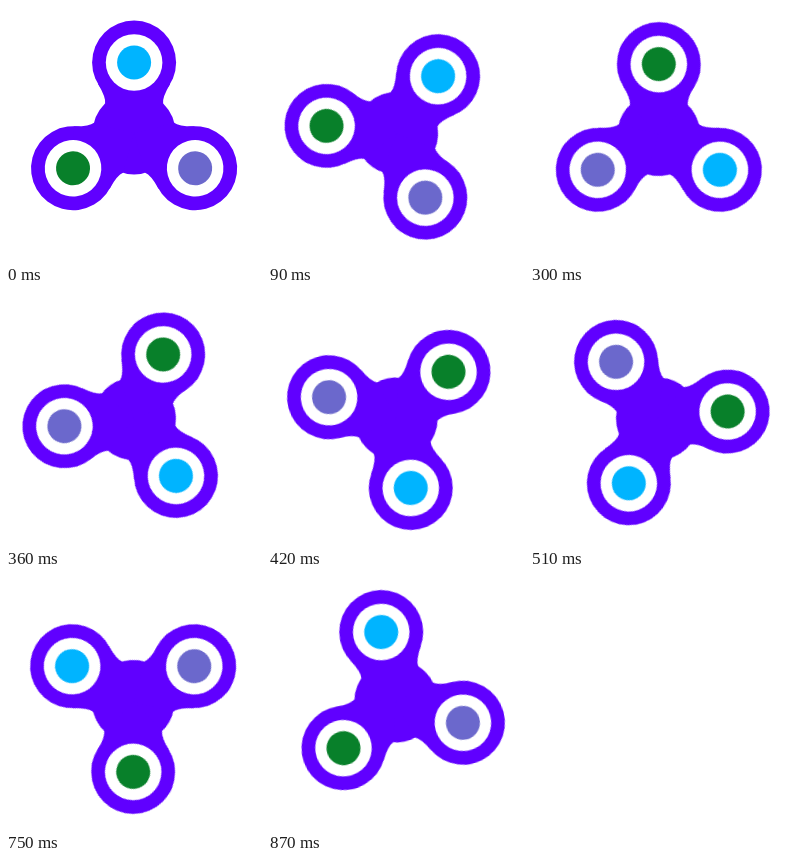
Recreate the animation shown at these times as an HTML page. Size 256 by 256 pixels, loop 0.9 s.

```html
<!DOCTYPE html>
<html lang="en">
<head>
<meta charset="utf-8">
<title>Spinner</title>
<style>
  html, body { margin: 0; width: 100%; height: 100%; overflow: hidden; background: #fff; }
  svg { display: block; width: 100vw; height: 100vh; }
  #spinner {
    transform-box: view-box;
    transform-origin: 128px 128px;
    animation: spin 900ms steps(30, end) infinite;
  }
  @keyframes spin { to { transform: rotate(360deg); } }
</style>
</head>
<body>
<svg viewBox="0 0 256 256">
  <defs>
    <g id="arm">
      <circle cy="-70.5" r="42"/>
      <path d="M-36-49Q-28-35.5-29-29.5L0 0L29-29.5Q28-35.5 36-49L0-70Z"/>
    </g>
    <circle id="ring" cy="-70.5" r="28.3" fill="#fff"/>
    <circle id="cap" cy="-70.5" r="17"/>
  </defs>
  <g id="spinner">
    <g transform="translate(128.1 127)">
      <g fill="#6000ff">
        <circle r="41.5"/>
        <use href="#arm"/>
        <use href="#arm" transform="rotate(120)"/>
        <use href="#arm" transform="rotate(240)"/>
      </g>
      <g fill="#00b4ff">
        <use href="#ring"/><use href="#cap"/>
      </g>
      <g fill="#6b68cc" transform="rotate(120)">
        <use href="#ring"/><use href="#cap"/>
      </g>
      <g fill="#08802a" transform="rotate(240)">
        <use href="#ring"/><use href="#cap"/>
      </g>
    </g>
  </g>
</svg>
</body>
</html>
```
